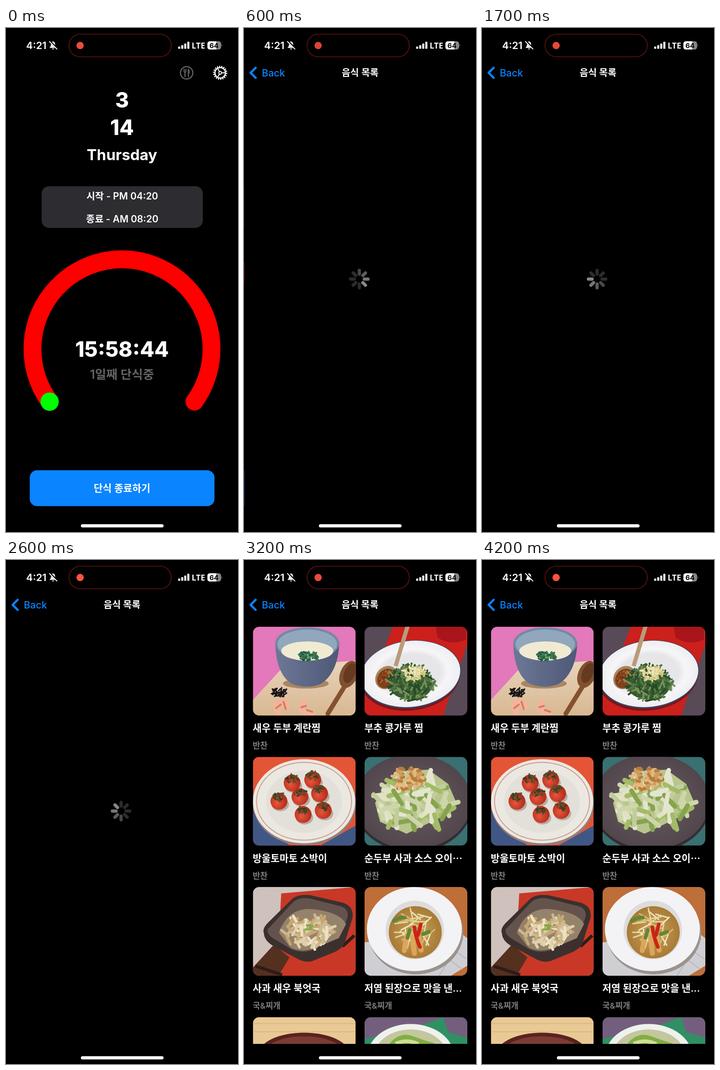
These frames come from a looping animation (508 px wide and 1102 px high, 4.3 s). An HTML page:

```html
<!DOCTYPE html>
<html lang="ko">
<head>
<meta charset="utf-8">
<title>단식 타이머</title>
<style>
@property --p { syntax: "<number>"; inherits: true; initial-value: 0; }
html, body { margin: 0; width: 100%; height: 100%; overflow: hidden; background: #000; }
svg { display: block; width: 508px; height: 1102px; font-family: Inter, "Noto Sans CJK KR", "Noto Sans CJK", sans-serif; }
text { fill: #fff; }
.mid { text-anchor: middle; }
.blue { fill: #0a84ff; }
.name { font-size: 21.4px; font-weight: 600; }
.kind { font-size: 17.8px; font-weight: 600; fill: #7c7c80; }
.big { font-size: 46px; font-weight: 800; }
.row { font-size: 20.8px; font-weight: 600; }

/* --p is the progress of the push: a critically damped spring (18.26 rad/s) at 10 fps */
#stage { animation: push 4.3s step-end infinite; }
#home { transform: translateX(calc(-152.4px * var(--p))); opacity: calc(1 - .07 * var(--p)); }
#food { transform: translateX(calc(508px * (1 - var(--p)))); }
#icons { opacity: calc(1 - var(--p) * var(--p)); }
#title { transform: translateX(calc(312px * (1 - var(--p)))); opacity: calc(var(--p) * var(--p)); }
#back { opacity: var(--p); }
#back text { transform: translateX(calc(45px * (1 - var(--p)))); }
#spin { animation: spin 4.3s steps(43) -2ms infinite; }
#wait { animation: leave 4.3s step-end infinite; }
#list { animation: enter 4.3s step-end infinite; }
#rec { animation: pulse 4.3s linear infinite; }
@keyframes push {
  0% { --p: 0; } 2.32% { --p: .041; } 4.65% { --p: .632; } 6.97% { --p: .906; }
  9.3% { --p: .979; } 11.62% { --p: .996; } 13.95% { --p: .999; } 16.27%, 100% { --p: 1; }
}
@keyframes spin { from { transform: rotate(225deg); } to { transform: rotate(2160deg); } }
@keyframes leave { 0% { opacity: 1; } 74.4%, 100% { opacity: 0; } }
@keyframes enter { 0% { opacity: 0; } 74.4%, 100% { opacity: 1; } }
@keyframes pulse {
  0% { opacity: .93; } 14% { opacity: .85; } 28%, 42% { opacity: .9; }
  55%, 70% { opacity: 1; } 74.4% { opacity: .92; } 88%, 100% { opacity: 1; }
}
</style>
</head>
<body>
<svg id="stage" viewBox="0 0 508 1102">
<defs>
  <clipPath id="photo"><rect width="225" height="194" rx="14"/></clipPath>
  <clipPath id="fold"><rect y="120" width="508" height="938"/></clipPath>
  <linearGradient id="bowl"><stop stop-color="#6c7896"/><stop offset="1" stop-color="#4e5877"/></linearGradient>
  <linearGradient id="wood" x2="0" y2="1"><stop stop-color="#e8d3ba"/><stop offset="1" stop-color="#d8b892"/></linearGradient>
  <radialGradient id="plate"><stop offset=".6" stop-color="#e6e6e9"/><stop offset=".75" stop-color="#f6f6f8"/><stop offset="1" stop-color="#eeeef2"/></radialGradient>
  <radialGradient id="tomato" cx=".4" cy=".6"><stop stop-color="#e8553c"/><stop offset="1" stop-color="#b9301f"/></radialGradient>
  <radialGradient id="broth"><stop stop-color="#c9a45c"/><stop offset="1" stop-color="#a87a35"/></radialGradient>
  <radialGradient id="dark"><stop stop-color="#6a5d62"/><stop offset="1" stop-color="#51464c"/></radialGradient>
  <path id="arm" d="M0-11V-19" stroke-width="7" stroke-linecap="round"/>
</defs>
<rect width="508" height="1102"/>

<g id="home">
  <g class="mid">
    <text class="big" x="254" y="174">3</text>
    <text class="big" x="254" y="234">14</text>
    <text x="254" y="289" font-size="33" font-weight="700">Thursday</text>
    <rect x="78" y="346" width="353" height="91" rx="16" fill="#2d2c30"/>
    <text class="row" x="254.500" y="374.500">시작 - PM 04:20</text>
    <text class="row" x="254.500" y="425">종료 - AM 08:20</text>
    <path d="M95.400 817A196 196 0 1 1 412.600 817" fill="none" stroke="#f00" stroke-width="39" stroke-linecap="round"/>
    <circle cx="95.500" cy="817" r="20" fill="#0f0"/>
    <text class="big" x="254" y="719">15:58:44</text>
    <text x="254" y="767" font-size="26.600" font-weight="600" style="fill:#636366">1일째 단식중</text>
    <rect x="52" y="967" width="404.500" height="78.500" rx="16" class="blue"/>
    <text x="254" y="1014" font-size="21.500" font-weight="600">단식 종료하기</text>
  </g>
</g>

<g id="food">
  <rect width="508" height="1102"/>
  <g id="wait"><g transform="translate(252 549)"><g id="spin">
    <use href="#arm" stroke="#8a8a8e"/>
    <use href="#arm" stroke="#78787b" transform="rotate(-45)"/>
    <use href="#arm" stroke="#5e5e61" transform="rotate(-90)"/>
    <use href="#arm" stroke="#474749" transform="rotate(-135)"/>
    <use href="#arm" stroke="#2e2e30" transform="rotate(-180)"/>
    <use href="#arm" stroke="#2c2c2e" transform="rotate(-225)"/>
    <use href="#arm" stroke="#2c2c2e" transform="rotate(-270)"/>
    <use href="#arm" stroke="#2c2c2e" transform="rotate(-315)"/>
  </g></g></g>

  <g id="list" clip-path="url(#fold)">
    <rect y="120" width="508" height="940"/>
    <g class="card">
      <rect width="225" height="194" fill="#e378ba"/>
      <path d="M0 160L68 86 225 74V194H0Z" fill="url(#wood)"/>
      <ellipse cx="116" cy="124" rx="50" ry="11" fill="#a98662"/>
      <path d="M49 34C49 84 66 116 88 126Q118 136 146 126C170 114 188 82 189 34Z" fill="url(#bowl)"/>
      <ellipse cx="119" cy="36" rx="70" ry="35" fill="#7589a3"/>
      <ellipse cx="119" cy="38" rx="65" ry="32" fill="#91a7bb"/>
      <ellipse cx="119" cy="53" rx="57" ry="21" fill="#f0ead3"/>
      <g class="bits" data-b="55 121 64 21 10 7 3 #2f6b4c #3f8058 #23553d"/>
      <path d="M206 122L164 190" stroke="#85512f" stroke-width="10" stroke-linecap="round"/>
      <ellipse cx="210" cy="104" rx="19" ry="31" transform="rotate(22 210 104)" fill="#80502f"/>
      <ellipse cx="212" cy="101" rx="12" ry="23" transform="rotate(22 212 101)" fill="#653a21"/>
      <g class="bits" data-b="40 58 143 17 9 6 3 #252020 #161214"/>
      <g fill="none" stroke-linecap="round">
        <path d="M55 188Q46 166 58 163T74 176M112 164Q104 178 112 184T128 190" stroke="#f0b49c" stroke-width="14"/>
        <path d="M51 178L61 170M67 164L72 180M106 176L116 173M118 182L130 186" stroke="#df7658" stroke-width="4"/>
      </g>
    </g>
    <g class="card">
      <rect width="225" height="194" fill="#594a57"/>
      <path d="M62 0H223L226 34 172 194H0V155Z" fill="#cb201c"/>
      <path d="M156 0H222V28Q190 42 160 24Z" fill="#a8151a"/>
      <ellipse cx="100" cy="110" rx="110" ry="73" transform="rotate(-7 100 110)" fill="#7c1517"/>
      <ellipse cx="101" cy="104" rx="111" ry="74" transform="rotate(-7 101 104)" fill="#39435f"/>
      <ellipse cx="101" cy="103" rx="109" ry="72" transform="rotate(-7 101 103)" fill="url(#plate)"/>
      <path d="M95-4L68 86" stroke="#b99b79" stroke-width="9"/>
      <ellipse cx="48" cy="111" rx="27" ry="23" transform="rotate(-50 48 111)" fill="#a78661"/>
      <ellipse cx="48" cy="113" rx="23" ry="19" transform="rotate(-50 48 113)" fill="#81401c"/>
      <g class="bits" data-b="35 48 113 17 16 3 2 #ca7a37 #5d2912 #aa582a"/>
      <ellipse cx="101" cy="130" rx="46" ry="29" fill="#395c31"/>
      <g class="bits" data-b="150 102 122 50 39 15 4 #355c2e #527744 #274a25 #76905c"/>
      <g class="bits" data-b="55 108 102 25 16 7 4 #e2d79b #cfc27d #efe7b9"/>
    </g>
    <g class="card">
      <rect width="225" height="194" fill="#e35535"/>
      <path d="M0 116L80 194H0ZM225 150V194H148Z" fill="#405785"/>
      <ellipse cx="113" cy="101" rx="113" ry="93" fill="#967d79"/>
      <ellipse cx="112" cy="97" rx="112" ry="92" fill="#ebe8e1"/>
      <ellipse cx="112" cy="97" rx="104" ry="85" fill="none" stroke="#bb756b" stroke-width="2" stroke-dasharray="2 1"/>
      <ellipse cx="112" cy="98" rx="83" ry="68" fill="#e3e0d9"/>
      <g id="tomatoes"/>
    </g>
    <g class="card">
      <rect width="225" height="194" fill="#397071"/>
      <ellipse cx="106" cy="103" rx="130" ry="105" fill="#332d32"/>
      <ellipse cx="106" cy="98" rx="128" ry="104" fill="url(#dark)"/>
      <path d="M42 64L78 31 140 28 183 59 201 100 165 133 92 168 34 142 23 101Z" fill="#b9c58d"/>
      <g class="bits" data-b="80 111 99 80 58 34 10 #cdd6ab #a3bb66 #dfe2c2 #86a350 #c2cd9b #e4e5cf"/>
      <g class="bits" data-b="80 93 48 37 26 6 6 #ce9c5e #b97c3d #e0ba7e"/>
    </g>
    <g class="card">
      <rect width="225" height="194" fill="#cfc2bc"/>
      <path d="M62 14L225 0V194H52Z" fill="#c93826"/>
      <path d="M0 176L46 126 80 154 56 194H0Z" fill="#54301f"/>
      <path d="M6 173L64 192M222 106L196 130" stroke="#2f1c18" stroke-width="7"/>
      <path d="M24 101Q20 91 33 78L87 25Q100 15 126 18L196 34Q222 42 218 68L202 119Q198 134 177 143L130 162Q114 167 94 155L43 128Q25 117 24 101Z" fill="#3c302e"/>
      <path d="M32 93L88 33Q101 22 124 25L192 42Q211 48 207 67L189 110 128 139Q105 145 84 136L44 112Q31 104 32 93Z" fill="#64534c"/>
      <path d="M57 100Q75 48 124 48 190 53 204 81L188 112 129 136Q102 143 82 132Z" fill="#95826a"/>
      <g class="bits" data-b="75 121 97 55 32 20 6 #e0cfaa #c6a773 #efe1c2 #ccb88f"/>
      <g class="bits" data-b="8 124 90 10 7 8 4 #82a947"/>
    </g>
    <g class="card">
      <rect width="225" height="194" fill="#bd6e39"/>
      <path d="M0 121L208 99 225 112V172L189 194H0Z" fill="#cfcfd3"/>
      <path d="M184 130L224 158M175 151L214 180M216 112L163 194" stroke="#b5b5bc" stroke-width="2"/>
      <ellipse cx="112" cy="100" rx="104" ry="91" fill="#9b938f"/>
      <ellipse cx="109" cy="92" rx="104" ry="92" fill="#f3f3f5"/>
      <ellipse cx="110" cy="94" rx="64" ry="64" fill="#dddcdb"/>
      <ellipse cx="111" cy="99" rx="58" ry="57" fill="url(#broth)"/>
      <g class="bits" data-b="32 111 93 36 38 28 3 #e5d49c #d6bd78 #f0e5bd"/>
      <g fill="none" stroke-linecap="round">
        <path d="M87 139L93 105M109 145L105 110M124 138L118 108" stroke="#dca65a" stroke-width="11"/>
        <path d="M109 88Q112 110 121 131M123 82L117 105" stroke="#ca2418" stroke-width="8"/>
        <path d="M64 74Q76 65 88 67M94 111L99 94M128 103L141 98" stroke="#648537" stroke-width="8"/>
      </g>
    </g>
    <g class="card">
      <rect width="225" height="194" fill="#e9c994"/>
      <path d="M0 14H225M0 32H225" stroke="#dab77e" stroke-width="2"/>
      <ellipse cx="112" cy="80" rx="99" ry="46" fill="#582320"/>
      <ellipse cx="112" cy="83" rx="91" ry="41" fill="#7e3b32"/>
    </g>
    <g class="card">
      <rect width="225" height="194" fill="#735f7d"/>
      <path d="M118 20L172 0 183 33 225 45V194H0V48Z" fill="#309064"/>
      <ellipse cx="101" cy="86" rx="95" ry="71" fill="#eff1ed"/>
      <ellipse cx="101" cy="90" rx="82" ry="63" fill="#c4c69e"/>
      <path d="M55 57Q78 31 107 42T153 57L139 80H64Z" fill="#82ae43"/>
      <path d="M68 58Q94 47 118 59" fill="none" stroke="#cfdf94" stroke-width="8"/>
    </g>
  </g>
</g>

<g id="icons" fill="none" stroke="#fff">
  <g stroke="#636366" stroke-width="2.500" stroke-linecap="round">
    <circle cx="395.500" cy="98" r="13.500"/>
    <path d="M392 97V106M399.500 90V106" />
    <path d="M389.500 90V95Q392 99 394.500 95V90M392 90V96" stroke-width="1.500"/>
    <path d="M399.500 90Q402.500 93 401.500 99H399.500Z" fill="#636366" stroke-width="1"/>
  </g>
  <g transform="translate(469 98)">
    <circle r="11.500" stroke-width="2.500"/>
    <circle r="14" stroke-width="3" pathLength="36" stroke-dasharray="1 1"/>
    <circle r="3" stroke-width="1.800"/>
    <path d="M3.500 0H11M-1.800-3L-5.500-9.500M-1.800 3L-5.500 9.500" stroke-width="2"/>
  </g>
</g>
<g id="back">
  <path d="M25.500 87L14.500 98 25.500 109" fill="none" stroke="#0a84ff" stroke-width="4.600" stroke-linecap="round" stroke-linejoin="round"/>
  <text class="blue" x="39" y="105.500" font-size="21.500" font-weight="500">Back</text>
</g>
<text id="title" class="mid" x="254" y="105" font-size="20.500" font-weight="600">음식 목록</text>

<text x="44" y="46" font-size="22" font-weight="600">4:21</text>
<g fill="#fff">
  <path d="M95 43.500H111Q107.500 41 107.500 36C107.500 32 105.500 29.500 103 29.500S98.500 32 98.500 36Q98.500 41 95 43.500ZM100.500 45Q103 49 105.500 45Z"/>
  <path d="M95 28L113 46" stroke="#000" stroke-width="4.500"/>
  <path d="M95 29.500L111.500 46" stroke="#fff" stroke-width="1.800" stroke-linecap="round"/>
  <rect x="377" y="40.500" width="4.500" height="5" rx="1.200"/>
  <rect x="383.700" y="37.500" width="4.500" height="8" rx="1.200"/>
  <rect x="390.300" y="34" width="4.500" height="11.500" rx="1.200"/>
  <rect x="397" y="30" width="4.500" height="15.500" rx="1.200"/>
  <text x="406.500" y="44.500" font-size="17.500" font-weight="600" style="font-family:'Noto Sans',sans-serif">LTE</text>
  <rect x="441" y="29" width="30" height="18" rx="5.500" fill="#85858a"/>
  <path d="M460.500 29H446.500A5.500 5.500 0 0 0 441 34.500V41.500A5.500 5.500 0 0 0 446.500 47H460.500Z"/>
  <path d="M472 35.500Q474.500 38 472 40.500Z" fill="#85858a"/>
  <text class="mid" x="455.500" y="43.500" font-size="15" font-weight="700" style="fill:#000">64</text>
</g>
<rect x="138" y="13.500" width="224" height="49.500" rx="24.700" stroke="#4d100d" stroke-width="2.200"/>
<circle id="rec" cx="162.300" cy="38.300" r="8" fill="#ff5240"/>
<rect x="164" y="1085" width="181" height="7" rx="3.500" fill="#fff"/>
</svg>
<script>
const make = (parent, tag, attrs, text = "") => {
  const el = document.createElementNS("http://www.w3.org/2000/svg", tag);
  for (const key in attrs) el.setAttribute(key, attrs[key]);
  el.textContent = text;
  return parent.appendChild(el);
};

let seed = 7;
const rand = () => (seed = seed * 16807 % 2147483647) / 2147483647;

// Scatter short strokes over an ellipse
function scatter(g, n, cx, cy, rx, ry, len, width, colors) {
  for (let i = 0; i < n; i++) {
    const a = rand() * 2 * Math.PI, r = Math.sqrt(rand()), t = rand() * Math.PI;
    const x = cx + rx * r * Math.cos(a), y = cy + ry * r * Math.sin(a);
    const dx = Math.cos(t) * len / 2, dy = Math.sin(t) * len / 2;
    make(g, "path", {
      d: `M${x - dx} ${y - dy}L${x + dx} ${y + dy}`,
      stroke: colors[i % colors.length], "stroke-width": width, "stroke-linecap": "round"
    });
  }
}

for (const g of document.querySelectorAll(".bits")) {
  const parts = g.dataset.b.split(" ");
  scatter(g, ...parts.slice(0, 7).map(Number), parts.slice(7));
}

const tray = document.getElementById("tomatoes");
for (const [x, y] of [[131, 50], [86, 57], [146, 80], [103, 87], [57, 97], [154, 117], [110, 126]]) {
  make(tray, "ellipse", { cx: x + 3, cy: y + 7, rx: 19, ry: 15, fill: "#b9aaa1" });
  make(tray, "circle", { cx: x, cy: y, r: 18.5, fill: "url(#tomato)" });
  scatter(tray, 18, x, y - 9, 13, 9, 6, 3, ["#4d512a", "#7b4526", "#343d20"]);
}

const dishes = [
  ["새우 두부 계란찜", "반찬"], ["부추 콩가루 찜", "반찬"],
  ["방울토마토 소박이", "반찬"], ["순두부 사과 소스 오이⋯", "반찬"],
  ["사과 새우 북엇국", "국&찌개"], ["저염 된장으로 맛을 낸...", "국&찌개"]
];
const list = document.getElementById("list");
document.querySelectorAll(".card").forEach((card, i) => {
  const x = i % 2 ? 264 : 19.5, y = 146 + 284.5 * Math.floor(i / 2);
  card.setAttribute("transform", `translate(${x} ${y})`);
  card.setAttribute("clip-path", "url(#photo)");
  if (!dishes[i]) return;
  make(list, "text", { class: "name", x: x - .5, y: y + 229 }, dishes[i][0]);
  make(list, "text", { class: "kind", x: x - .5, y: y + 266 }, dishes[i][1]);
});
</script>
</body>
</html>
```
